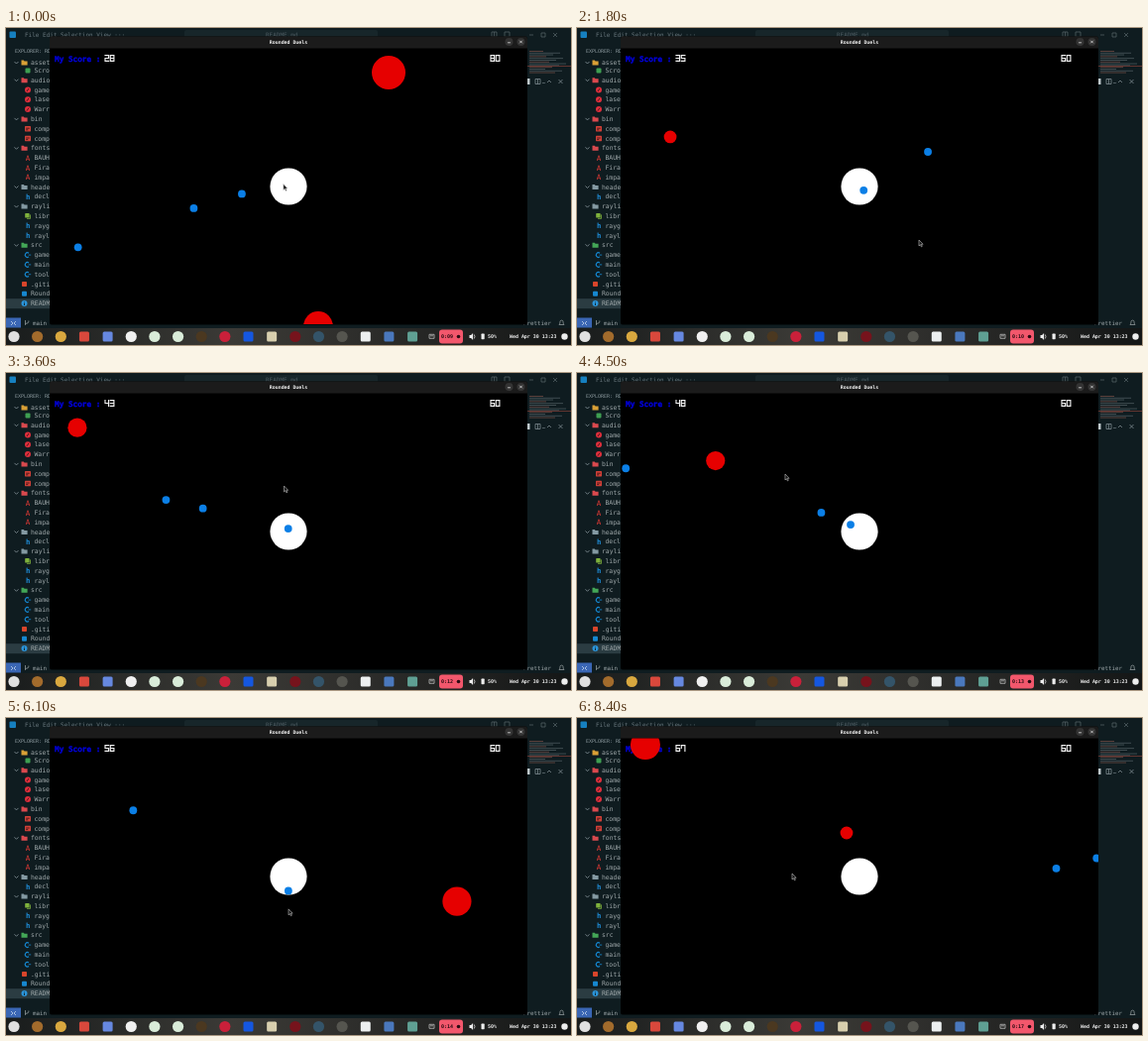
Animation, 570 px wide and 320 px high, one loop 8.5 s. Source, as an HTML page:

```html
<!DOCTYPE html>
<html lang="en">
<head>
<meta charset="utf-8">
<title>Rounded Duels</title>
<style>
html, body { margin: 0; width: 100%; height: 100%; overflow: hidden; background: #000; }
svg { display: block; width: 570px; height: 320px; }
text { font-family: "DejaVu Sans Mono", "Liberation Mono", monospace; white-space: pre; }
.digits { fill: none; stroke: #f0f0f0; stroke-width: 1.15; stroke-linecap: square; }
</style>
</head>
<body>
<svg viewBox="0 0 570 320" xmlns="http://www.w3.org/2000/svg">
  <defs>
    <clipPath id="arena"><rect x="44" y="20.5" width="482" height="278.5"/></clipPath>
    <linearGradient id="panel">
      <stop offset="0" stop-color="#191c1c"/><stop offset=".4" stop-color="#3b3a36"/>
      <stop offset=".65" stop-color="#2c2c2a"/><stop offset="1" stop-color="#141616"/>
    </linearGradient>
  </defs>
  <g id="editor"></g>
  <g id="bar"></g>
  <rect x="44" y="8.5" width="482" height="291" rx="2" fill="#000"/>
  <path d="M44 20.5V10.5a2 2 0 0 1 2-2H524a2 2 0 0 1 2 2V20.5Z" fill="#1b1b1b"/>
  <text x="285" y="15.8" font-size="4.9" font-weight="700" fill="#f2f2f2" text-anchor="middle">Rounded Duels</text>
  <g fill="#343434"><circle cx="507.5" cy="14" r="4"/><circle cx="519.5" cy="14" r="4"/></g>
  <path d="M506 14.8h3M518.2 12.7l2.6 2.6m0-2.6l-2.6 2.6" stroke="#ddd" stroke-width=".8"/>
  <g clip-path="url(#arena)">
    <text x="49" y="33.8" font-size="7.7" font-weight="700" fill="#0000dc" stroke="#0000dc" stroke-width=".35">My Score :</text>
    <path id="score" class="digits"/>
    <path id="fps" class="digits"/>
    <circle cx="285" cy="160" r="18.6" fill="#fff"/>
    <g id="foes" fill="#e60000"></g>
    <g id="shots" fill="#0b7fe6"></g>
  </g>
  <path id="mouse" d="M0 0V6L1.4 4.7 2.4 6.9 3.3 6.4 2.4 4.3H4.1Z" fill="#111" stroke="#c4c4c4" stroke-width=".6"/>
</svg>
<script>
const LOOP = 8500, STEP = 100, HOLD = 500;
const CX = 285, CY = 160;
const FOE_SPEED = .084, SHOT_SPEED = .172;   // px per ms
const SPAWN = 265, REACH = 280, SHOT_R = 3.9;
const $ = id => document.getElementById(id);

const rect = (x, y, w, h, fill, rx = 0) =>
  `<rect x="${x}" y="${y}" width="${w}" height="${h}" rx="${rx}" fill="${fill}"/>`;
const dot = (x, y, r, fill) => `<circle cx="${x}" cy="${y}" r="${r}" fill="${fill}"/>`;
const label = (x, y, size, fill, str, extra = "") =>
  `<text x="${x}" y="${y}" font-size="${size}" fill="${fill}" ${extra}>${str}</text>`;
const line = (d, color, w = .8) =>
  `<path d="${d}" fill="none" stroke="${color}" stroke-width="${w}"/>`;

// Explorer rows: kind and name.
const rows = ("Y assets|s Scroll|R audio|a game.mp3|a laser.mp3|a Warrior|R bin|b compile|b compile|R fonts|" +
  "t BAUHS|t FiraCode|t impact|F headers|h declare.h|F raylib|l libray|h raygui.h|h raylib.h|G src|" +
  "c game.cpp|c main.cpp|c tool.cpp|g .gitignore|C Rounded|i README.md").split("|");
const folders = { Y: "#d9a036", R: "#d9494e", F: "#8499a2", G: "#43a657" };
const TEXT = "#9fa8aa", BASE = "#0f1c20";

const icons = {
  s: (x, y) => rect(x - 2.5, y - 2.5, 5, 5, "#3f9f52", 1),
  a: (x, y) => dot(x, y, 3, "#e02f3c") + line(`M${x - 1} ${y + 1.5}l2-3`, "#2a1014"),
  b: (x, y) => rect(x - 3, y - 2.7, 6, 5.4, "#cf4038", .6) + line(`M${x - 1.8} ${y - .5}h3.6m-3.6 1.6h2`, "#2a1014"),
  t: (x, y) => label(x - 2.3, y + 2.7, 7.4, "#e53a35", "A"),
  h: (x, y) => label(x - 2, y + 2.7, 7.2, "#1f8fdb", "h", 'font-weight="700"'),
  l: (x, y) => rect(x - 2.8, y - 2.8, 4.4, 4.4, "#7fb23c", .6) + line(`M${x - 1} ${y + 2.5}h3.5v-4`, "#7fb23c"),
  c: (x, y) => line(`M${x + 1} ${y - 1.8}a2.3 2.3 0 1 0 0 3.6`, "#1589d4", 1.2) + line(`M${x + .6} ${y}h2.6`, "#1589d4"),
  C: (x, y) => rect(x - 2.5, y - 2.5, 5, 5, "#1687cf", 1),
  g: (x, y) => rect(x - 2.5, y - 2.5, 5, 5, "#d8452b", .8),
  i: (x, y) => dot(x, y, 3, "#2b94d9") + line(`M${x} ${y - 1.6}v.9m0 .6v1.9`, BASE, .9),
};

const explorer = () => rows.map((row, i) => {
  const kind = row[0], y = Math.max(35, 33.1 + 9.8 * i);
  const root = kind in folders || "gCi".includes(kind), x = root ? 18.5 : 22;
  const icon = kind in folders
    ? line(`M8.5 ${y - 1}l2 2 2-2`, "#8b999f") +
      `<path d="M${x - 3} ${y - 2.5}h2.3l.8 1h3v4h-6.1z" fill="${folders[kind]}"/>`
    : icons[kind](x, y);
  return icon + label(root ? 25 : 28.5, y + 2.1, 6.4, TEXT, row.slice(2));
}).join("");

function editor() {
  let out = rect(0, 0, 570, 303, BASE) + rect(180, 2, 195, 8, "#17262a", 2) +
    rect(3.5, 3.5, 6.5, 6.5, "#1680c0", 1) +
    label(19, 9, 6, "#69777d", "File Edit Selection View ···") +
    label(262, 9, 6, "#4c5a60", "README.md") +
    line("M490 4h5v5h-5zm2.5 0v5M503 4h5v5h-5zM528 7h4M540 5h4v4h-4zM552 5l4 4m0-4l-4 4", "#59676c", .7) +
    label(9, 24.7, 5, "#8a979c", "EXPLORER: RD") +
    rect(0, 273.2, 44, 10, "#2b3c42") + explorer();
  for (let i = 0; i < 13; i++)
    out += rect(528, 23 + i * 1.8, 14 + (i * 17) % 24, .9, i % 3 ? "#435155" : "#63443f");
  out += rect(526, 38, 44, .9, "#6b3833") + rect(526, 51, 2.5, 6, "#bfc8cb") +
    line("M534 51.5h5v5h-5zm2.5 0v5M546 55l2-2 2 2M557.5 52l4 4m0-4l-4 4", "#8c999e", .7) +
    label(541, 56, 5.5, "#8c999e", "…");
  return out + rect(0, 292.5, 15, 10, "#3a66b4") +
    line("M5 296l2 2-2 2m5-4l-2 2 2 2", "#d5e2f2", .7) +
    line("M19.5 295v5m3.3-4.5v1.5q0 1-3.3 1.5", TEXT, .7) +
    label(27, 299.8, 5.8, TEXT, "main") + label(522, 299.6, 5.8, TEXT, "Prettier") +
    line("M558 299.5h5l-.9-1.4v-1.4a1.6 1.6 0 0 0-3.2 0v1.4z", TEXT, .7);
}

// One plain mark per app, evenly spaced; a leading # marks a square.
const apps = ("e0e0e0 a26b2c d9a83f #d9483c #6688e0 f0f0f0 d9ecd9 d9ecd9 4b3820 c9203a " +
  "#1557e0 #d8cfae 76131c 345469 55554f #eceff0 #4a78bd #5f9f93").split(" ");

function taskbar() {
  const bold = 'font-weight="700"';
  return rect(0, 303, 570, 17, "url(#panel)") + apps.map((app, i) => {
    const x = 8 + 23.65 * i;
    return app[0] === "#" ? rect(x - 5, 306.5, 10, 10, app, 1.5) : dot(x, 311.5, 5.6, "#" + app);
  }).join("") +
    line("M427 309.3h5v4h-5zm1 1.5h3", "#bbb") + rect(437, 304.5, 24, 14, "#f2576c", 3) +
    label(439, 313.2, 5, "#2b0b12", "0:09", `id="clock" ${bold}`) + dot(456.5, 311.5, 1.8, "#2b0b12") +
    `<path d="M467.5 310h1.6l2-2v7l-2-2h-1.6z" fill="#eee"/>` + line("M472.3 309.5q1.4 2 0 4", "#eee", .7) +
    rect(479.5, 308.6, 3.2, 5.6, "#eee", .6) + label(486, 313.2, 5, "#eee", "50%", bold) +
    label(508, 313.2, 4.95, "#eee", "Wed Apr 30 13:23", bold) + dot(563.5, 311.5, 3.2, "#eee");
}

// Blocky digits from seven strokes.
const strokes = { a: "0 0h3.6", b: "3.6 0v2.9", c: "3.6 2.9v2.9", d: "0 5.8h3.6", e: "0 2.9v2.9", f: "0 0v2.9", g: "0 2.9h3.6" };
const parts = "abcdef bc abdeg abcdg bcfg acdfg acdefg abcf abcdefg abcdfg".split(" ");
const digits = (n, x, y) => [...String(n)].map((d, i) =>
  [...parts[d]].map(p => `M${x + i * 5.3} ${y}m${strokes[p]}`).join("")).join("");

// Every pointer stop is a click that fires a shot: time, x, y.
const stops = [
  [-785, 214, 180.5], [-70, 237, 171], [223, 275.5, 161.5], [790, 313, 128], [1350, 354, 125],
  [1430, 298, 221], [1767, 345, 214], [2350, 225, 144], [2858, 225, 144.5], [3080, 224, 143.5],
  [3583, 280.5, 114], [4250, 205, 120.5], [4434, 210, 102], [5110, 170, 111], [5600, 245, 225],
  [6016, 284.7, 193], [6587, 390, 150], [6880, 395, 149.5], [7005, 395, 151.5], [7245, 394, 155.5],
  [8400, 217, 157]];
const shots = stops.map(([born, x, y]) => ({ born, angle: Math.atan2(y - CY, x - CX), gone: LOOP, r: SHOT_R }));

// Foes: bearing in degrees, time they would reach the centre, radius.
const foes = [
  [-48.7, 2322, 17], [78, 2216, 15], [194.7, 4150, 6.4], [206.2, 6427, 9.6],
  [121.8, 6882, 8.7], [8.4, 8145, 14.6], [253.5, 8946, 6.4], [211.6, 11420, 15]
].map(([deg, due, r]) => ({ angle: deg * Math.PI / 180, due, r, gone: LOOP }));

const shotRange = (s, t) => (t - s.born) * SHOT_SPEED;
const foeRange = (f, t) => (f.due - t) * FOE_SPEED;
const shotLives = (s, t) => t > s.born && t < s.gone && shotRange(s, t) < REACH;
const foeLives = (f, t) => t < f.gone && foeRange(f, t) < SPAWN;
const point = (o, d) => [CX + d * Math.cos(o.angle), CY + d * Math.sin(o.angle)];

// Play the game once to learn which shot stops which foe.
for (let t = stops[0][0]; t < LOOP; t += 10)
  for (const s of shots) for (const f of foes) {
    if (!shotLives(s, t) || !foeLives(f, t)) continue;
    const [x, y] = point(s, shotRange(s, t)), [u, v] = point(f, foeRange(f, t));
    if (Math.hypot(x - u, y - v) < s.r + f.r) s.gone = f.gone = t;
  }

// The pointer rests after a click, then hurries to the next stop.
function pointer(t) {
  const i = stops.findIndex(s => s[0] >= t), [a, b] = [stops[i - 1], stops[i]];
  const k = ((t - a[0]) / (b[0] - a[0])) ** 3;
  return [a[1] + (b[1] - a[1]) * k, a[2] + (b[2] - a[2]) * k];
}

function place(group, list, range, lives, t) {
  list.forEach((o, i) => {
    const el = group.children[i], [x, y] = point(o, range(o, t));
    el.setAttribute("cx", x);
    el.setAttribute("cy", y);
    el.setAttribute("visibility", lives(o, t) ? "visible" : "hidden");
  });
}

function draw(t) {
  place($("foes"), foes, foeRange, foeLives, t);
  place($("shots"), shots, shotRange, shotLives, t);
  $("score").setAttribute("d", digits(Math.floor(28.9 + .00485 * (t - HOLD)), 100, 27.6));
  $("fps").setAttribute("d", digits(t < 1600 ? 80 : 60, 489, 27.6));
  $("clock").textContent = "0:" + String(Math.floor(10 + (t - 1330) / 970)).padStart(2, "0");
  $("mouse").setAttribute("transform", `translate(${pointer(t)})`);
}

const circles = list => list.map(o => `<circle r="${o.r}"/>`).join("");
$("editor").innerHTML = editor();
$("bar").innerHTML = taskbar();
$("foes").innerHTML = circles(foes);
$("shots").innerHTML = circles(shots);

const begin = performance.now();
function tick() {
  const t = (performance.now() - begin) % LOOP;
  draw(Math.max(HOLD, Math.floor(t / STEP) * STEP));
  requestAnimationFrame(tick);
}
tick();
</script>
</body>
</html>
```
